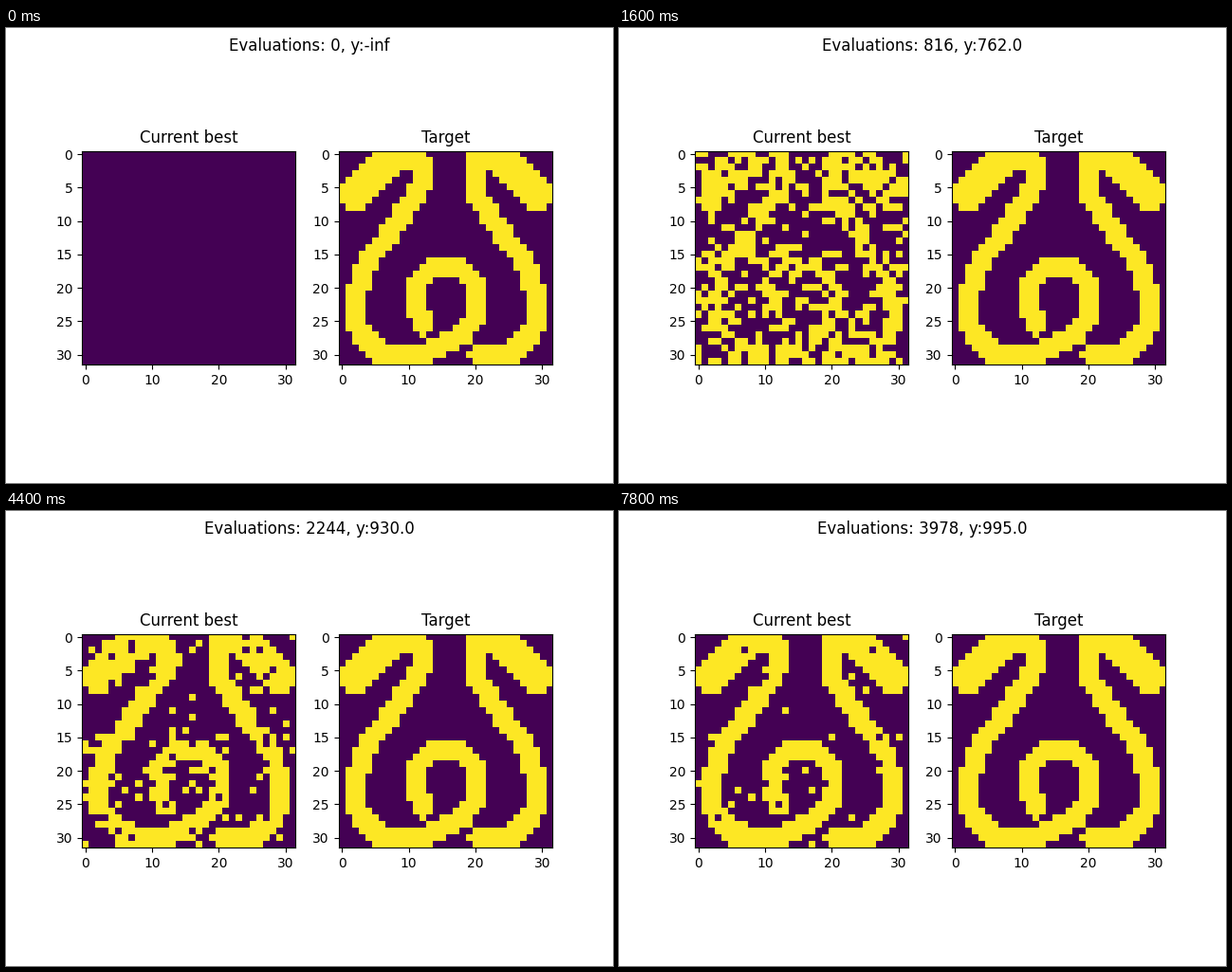
A matplotlib script that plays this animation: 640x480 px, repeating every 8000 ms.

```python
import numpy as np
import matplotlib.pyplot as plt
from matplotlib.animation import FuncAnimation

SIZE = 32
FRAMES = 40
EVALS_PER_FRAME = 102
THIN, THICK = 1.52, 2.4

# Centre lines of the brush strokes, in (column, row).
LEAF = [(2, 6), (7, 1), (10.5, 0)]
ARM = [(10.5, 7), (4, 16), (2, 21), (2, 25), (3, 27), (6, 30)]
SPIRAL = [(6, 30), (10, 30), (13, 29.5), (18, 27), (20, 24.5), (20.5, 21.5),
          (20, 19.3), (18, 17.3), (13, 17.3), (11, 20), (11, 23), (12.3, 25.6)]

# Wrong cells left at key steps; between them the error decays geometrically.
ERRORS = {1: 444, 4: 354, 12: 194, 22: 94, 27: 66, 34: 44, 39: 29}


def mirror(points):
    return [(SIZE - 1 - x, y) for x, y in points]


def paint(grid, points, radius):
    """Set every cell whose centre is within radius of the polyline."""
    rows, cols = np.indices(grid.shape)
    for (x0, y0), (x1, y1) in zip(points, points[1:]):
        dx, dy = x1 - x0, y1 - y0
        t = ((cols - x0) * dx + (rows - y0) * dy) / (dx * dx + dy * dy)
        t = np.clip(t, 0, 1)
        near = np.hypot(cols - x0 - t * dx, rows - y0 - t * dy) <= radius
        grid[near] = 1


def make_target():
    grid = np.zeros((SIZE, SIZE), int)
    paint(grid, LEAF, THICK)
    paint(grid, mirror(LEAF), THICK)
    paint(grid, [(12, 2), (12, 4)] + ARM, THIN)
    paint(grid, [(20, 2), (20, 4)] + mirror(ARM) + [(20.4, 30)], THIN)
    paint(grid, SPIRAL, THIN)
    return grid


def error_count(step):
    logs = np.log(list(ERRORS.values()))
    return int(round(np.exp(np.interp(step, list(ERRORS), logs))))


target = make_target()
order = np.random.default_rng(7).permutation(target.size)

fig, (ax_best, ax_target) = plt.subplots(1, 2, figsize=(6.4, 4.8), dpi=100)
title = fig.suptitle("")
best_image = ax_best.imshow(np.zeros_like(target), vmin=0, vmax=1)
ax_best.set_title("Current best")
ax_target.imshow(target, vmin=0, vmax=1)
ax_target.set_title("Target")


def update(step):
    if step == 0:
        best, score = np.zeros_like(target), "-inf"
    else:
        errors = error_count(step)
        best = target.copy()
        best.flat[order[:errors]] ^= 1
        score = f"{target.size - errors:.1f}"
    best_image.set_data(best)
    title.set_text(f"Evaluations: {step * EVALS_PER_FRAME}, y:{score}")
    return best_image, title


anim = FuncAnimation(fig, update, frames=FRAMES, interval=200,
                     repeat=True, repeat_delay=0, blit=False)
plt.show()
```
